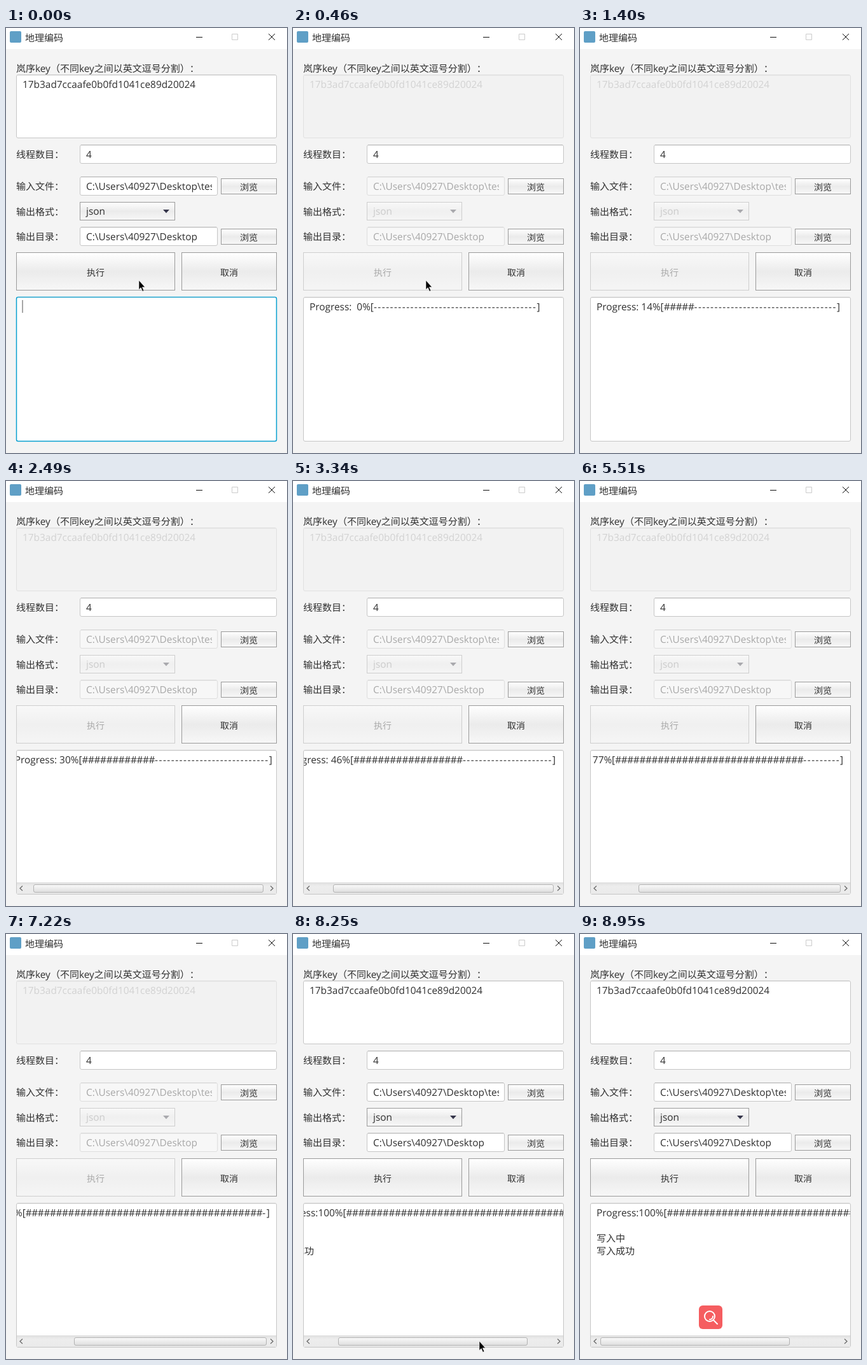
Recreate the animation shown at these times as an HTML page. Size 442 by 667 pixels, loop 9.18 s.

```html
<!DOCTYPE html>
<html lang="zh-CN">
<head>
<meta charset="utf-8">
<title>地理编码</title>
<style>
html, body { margin: 0; width: 100%; height: 100%; overflow: hidden; background: #f4f4f4; }
svg { display: block; }
text {
  font-family: "Noto Sans CJK SC", "Noto Sans CJK", sans-serif;
  font-size: 15px; fill: #303030; white-space: pre;
  text-rendering: geometricPrecision; text-spacing-trim: space-all;
}
.en { font-family: "Open Sans", "Noto Sans", sans-serif; font-size: 15.4px; }
.caption { font-size: 14px; text-anchor: middle; }
#hashes { letter-spacing: -.39px; }
#dashes { letter-spacing: 1.46px; }
.field { fill: #fff; stroke: #c6c6c6; }
.shade { fill: none; stroke: #ededed; }
.shade.top { stroke: #b8b8b8; }
.button { fill: url(#face); stroke: #9b9b9b; }
.combo .arrow { fill: #35354a; }
.pressed #run .button, .focused #output { stroke: #079fd0; stroke-width: 1.5; }
.busy .key .field { fill: #f2f2f2; stroke: #e0e0e0; }
.busy .key .shade { stroke: #e6e6e6; }
.busy .key text { fill: #d2d2d2; }
.busy .path .field { fill: #f7f7f7; stroke: #dedede; }
.busy .path .shade { stroke: #ececec; }
.busy .path .shade.top { stroke: #d6d6d6; }
.busy .path text { fill: #a8a8a8; }
.busy .combo .button, .busy #run .button { opacity: .42; }
.busy .combo text { fill: #cbcbcb; }
.busy .combo .arrow { fill: #a9a9ad; }
.busy #run text { fill: #a9a9a9; }
</style>
</head>
<body>
<svg id="stage" width="442" height="667" viewBox="0 0 442 667">
  <defs>
    <linearGradient id="face" x2="0" y2="1">
      <stop offset="0" stop-color="#fff"/><stop offset=".5" stop-color="#ebebeb"/><stop offset="1" stop-color="#f7f7f7"/>
    </linearGradient>
    <linearGradient id="grip" x2="0" y2="1">
      <stop offset="0" stop-color="#fafafa"/><stop offset="1" stop-color="#dedede"/>
    </linearGradient>
    <linearGradient id="groove" x2="0" y2="1">
      <stop offset="0" stop-color="#e2e2e2"/><stop offset=".3" stop-color="#ededed"/><stop offset="1" stop-color="#eaeaea"/>
    </linearGradient>
    <clipPath id="pathClip"><path d="M126 234h198v28H126z"/></clipPath>
    <clipPath id="outClip"><path d="M17 423h408v225H17z"/></clipPath>
  </defs>

  <path fill="#f4f4f4" d="M0 0h442v667H0z"/>
  <path fill="#fff" d="M0 0h442v33H0z"/>
  <rect x="6" y="5" width="18" height="18" rx="2" fill="#5f9fc6"/>
  <text x="30" y="20.5">地理编码</text>
  <path d="M299 14.5h10M413 9l10 10M423 9l-10 10" stroke="#111" fill="none"/>
  <path d="M355.500 9.500h9v9h-9z" stroke="#ccc" fill="none"/>

  <text x="16" y="69">岚序<tspan class="en">key</tspan>（不同<tspan class="en">key</tspan>之间以英文逗号分割）：</text>
  <g class="key">
    <rect class="field" x="16.500" y="73.500" width="409" height="99" rx="2.500"/>
    <path class="shade" d="M18 74.500h406"/>
    <text class="en" x="26" y="94">17b3ad7ccaafe0b0fd1041ce89d20024</text>
  </g>

  <text x="16" y="204">线程数目：</text>
  <rect class="field" x="116.500" y="183.500" width="309" height="29" rx="2.500"/>
  <path class="shade top" d="M118 183.500h306"/><path class="shade" d="M118 184.500h306"/>
  <text class="en" x="126" y="204">4</text>

  <text x="16" y="254">输入文件：</text>
  <g class="path">
    <rect class="field" x="116.500" y="233.500" width="216" height="29" rx="2.500"/>
    <path class="shade top" d="M118 233.500h213"/><path class="shade" d="M118 234.500h213"/>
    <text class="en" x="126" y="254" clip-path="url(#pathClip)">C:\Users\40927\Desktop\test.xlsx</text>
  </g>
  <rect class="button" x="338.500" y="236.500" width="87" height="24"/>
  <text class="caption" x="382" y="254.500">浏览</text>

  <text x="16" y="294">输出格式：</text>
  <g class="combo">
    <rect class="button" x="116.500" y="273.500" width="149" height="28"/>
    <text class="en" x="126" y="293">json</text>
    <path class="arrow" d="M247 285h10l-5 5.500z"/>
  </g>

  <text x="16" y="333">输出目录：</text>
  <g class="path">
    <rect class="field" x="116.500" y="312.500" width="216" height="29" rx="2.500"/>
    <path class="shade top" d="M118 312.500h213"/><path class="shade" d="M118 313.500h213"/>
    <text class="en" x="126" y="333">C:\Users\40927\Desktop</text>
  </g>
  <rect class="button" x="338.500" y="315.500" width="87" height="24"/>
  <text class="caption" x="382" y="333.500">浏览</text>

  <g id="run">
    <rect class="button" x="16.500" y="352.500" width="249" height="59"/>
    <text class="caption" x="141" y="388.500">执行</text>
  </g>
  <rect class="button" x="276.500" y="352.500" width="149" height="59"/>
  <text class="caption" x="351" y="388.500">取消</text>

  <rect id="output" class="field" x="16.500" y="422.500" width="409" height="226" rx="2.500"/>
  <path class="shade" d="M18 423.500h406"/>
  <path id="caret" d="M26 427v20" stroke="#8a8a8a" stroke-width="1.500"/>
  <g clip-path="url(#outClip)">
    <g id="log">
      <text class="en" x="26" y="443"><tspan id="head"></tspan><tspan id="hashes"></tspan><tspan id="dashes"></tspan>]</text>
      <g id="done">
        <text x="26" y="483">写入中</text>
        <text x="26" y="503">写入成功</text>
      </g>
    </g>
    <g id="bar">
      <path fill="url(#groove)" d="M17 631h408v17H17z"/>
      <path d="M17 630.500h408" stroke="#dcdcdc"/>
      <path d="M26 635.500l-4 3.700 4 3.700M416 635.500l4 3.700-4 3.700" fill="none" stroke="#6a6a6a" stroke-width="1.300"/>
      <rect id="thumb" y="633.500" height="12" rx="2.500" fill="url(#grip)" stroke="#b2b2b2"/>
    </g>
  </g>

  <g id="search">
    <rect x="187" y="583" width="37" height="37" rx="6" fill="#f55d60"/>
    <g fill="none" stroke="#fff" stroke-width="2" stroke-linecap="round">
      <circle cx="204" cy="600" r="8"/>
      <path d="M210 606l6 6M204 605a5 5 0 0 0 5-5" />
    </g>
  </g>
  <path id="cursor" d="M0 0V14.500l3.200-3 2.500 5.800 2.200-1-2.500-5.500h4.300z" fill="#000" stroke="#fff" stroke-width=".6"/>
</svg>
<script>
const LOOP = 9180, START = 300, BUSY = 380, DONE = 7530;
const VIEW = 408, TRACK = 378, TRACK_X = 32;
// [time, percent]
const progress = [
  [460, 0], [780, 3], [1090, 6], [1250, 9], [1400, 14], [1790, 19], [2170, 25],
  [2490, 30], [2800, 36], [3030, 41], [3340, 46], [3650, 51], [3880, 56],
  [4190, 61], [4500, 66], [5050, 72], [5510, 77], [6060, 82], [6450, 87],
  [6910, 93], [7220, 98], [DONE, 100]
];
// [time, x, y]; no position hides the pointer
const pointer = [
  [0, 209, 396], [1090, 262, 403], [1170, 318, 418], [1250],
  [7690, 322, 660], [7770, 332, 648], [7850, 334, 641], [7930, 334, 639],
  [8010, 327, 639], [8090, 318, 639], [8170, 306, 639], [8250, 293, 639],
  [8330, 277, 639], [8410, 262, 639], [8490, 254, 639],
  [8640, 250, 648], [8720, 246, 660], [8800]
];
const GRAB = 7930, GRAB_X = 334, DROP = 8490;

const $ = id => document.getElementById(id);
const show = (id, on) => $(id).setAttribute("visibility", on ? "visible" : "hidden");
const indexAt = (list, t) => list.findLastIndex(step => step[0] <= t);
const hashCount = p => Math.max(0, Math.round(p * .4 - .2));
const overflow = p => Math.max(0, 3.06 * (hashCount(p) - 6) + (p === 100 ? 5 : 0));

function scrollAt(t, i, max) {
  if (t < DONE) return overflow(progress[i - i % 2][1]); // follows every second update
  if (t < GRAB) return max;
  if (t >= DROP) return 0;
  const dragged = GRAB_X - pointer[indexAt(pointer, t)][1];
  return Math.max(0, max - dragged * (VIEW + max) / TRACK);
}

function drawLog(t) {
  const i = indexAt(progress, t);
  show("log", i >= 0);
  show("done", t >= DONE);
  if (i < 0) return show("bar", false);
  const p = progress[i][1], n = hashCount(p);
  $("head").textContent = "Progress:" + String(p).padStart(3) + "%[";
  $("hashes").textContent = "#".repeat(n);
  $("dashes").textContent = "-".repeat(40 - n);

  const max = overflow(p), scroll = scrollAt(t, i, max), scale = TRACK / (VIEW + max);
  $("log").setAttribute("transform", `translate(${-scroll})`);
  show("bar", max > 0);
  $("thumb").setAttribute("x", Math.round(TRACK_X + scroll * scale) + .5);
  $("thumb").setAttribute("width", Math.round(VIEW * scale) - 1);
}

function draw(t) {
  const state = t < START ? "focused" : t < BUSY ? "pressed" : t < DONE ? "busy" : "";
  $("stage").setAttribute("class", state);
  show("caret", t < START);
  drawLog(t);
  const [, x, y] = pointer[indexAt(pointer, t)];
  show("cursor", x !== undefined);
  if (x !== undefined) $("cursor").setAttribute("transform", `translate(${x} ${y})`);
  $("search").setAttribute("opacity", t < 8800 ? 0 : t < 8950 ? .6 : 1);
}

const begin = performance.now();
function tick() {
  draw((performance.now() - begin) % LOOP);
  requestAnimationFrame(tick);
}
tick();
</script>
</body>
</html>
```
